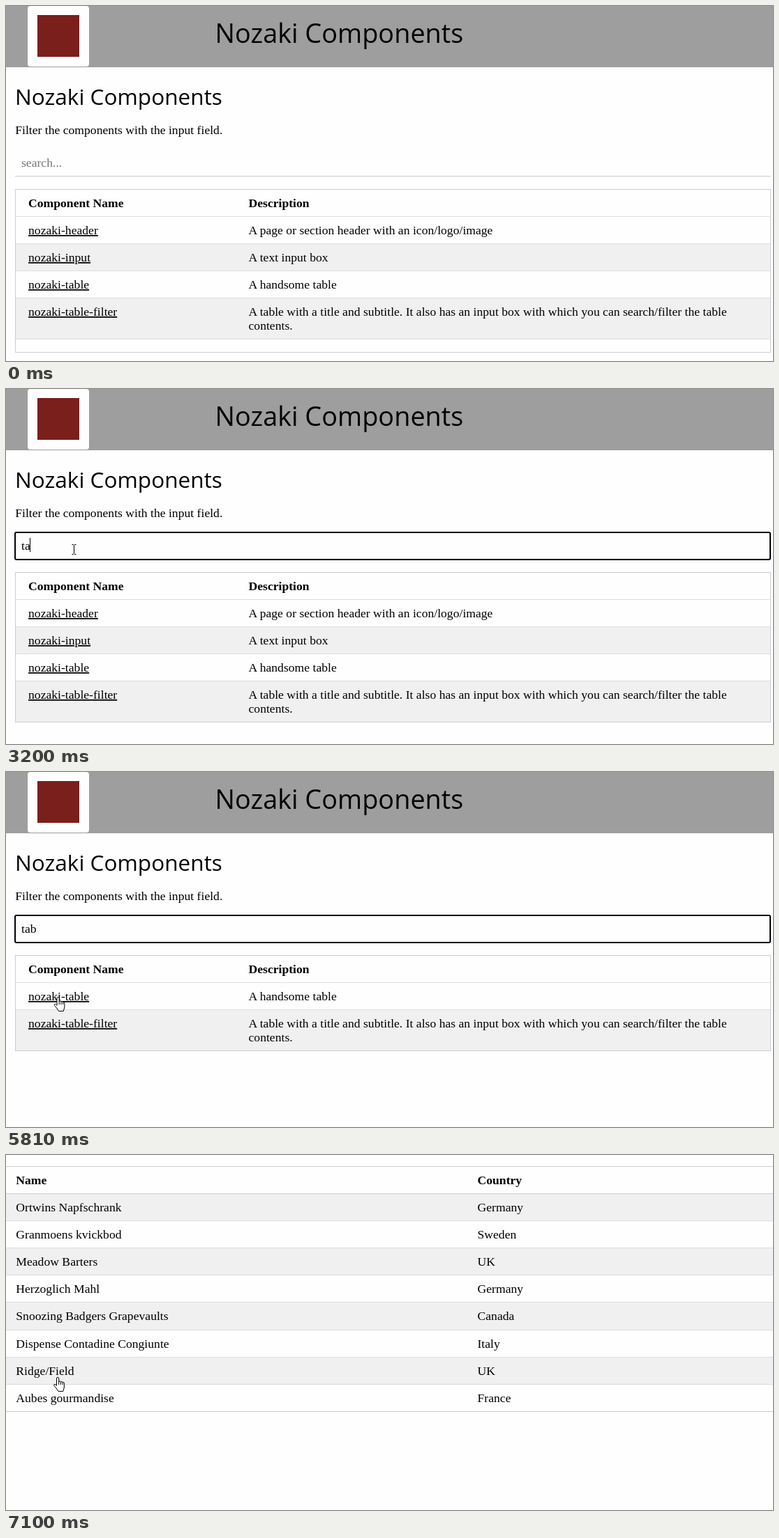
An HTML page that plays this animation: 1099x510 px, repeating every 8000 ms.

```html
<!DOCTYPE html>
<html lang="en">
<head>
<meta charset="utf-8">
<title>Component filter</title>
<style>
  html, body { margin: 0; width: 100%; height: 100%; overflow: hidden; background: #fefefe; }
  svg { display: block; width: 1099px; height: 510px; }
  text { font: 17.64px "Liberation Serif", serif; fill: #000; white-space: pre; }
  .bold { font-weight: bold; }
  .link { text-decoration: underline; }
  .hint { fill: #757575; }
  .mid { text-anchor: middle; }
  .title { font: 37.8px "Open Sans", sans-serif; }
  .heading { font: 31.55px "Open Sans", sans-serif; }
  .outline { fill: none; stroke: #ccc; }
  .cursor { fill: #fff; stroke: #000; stroke-linejoin: round; }
</style>
</head>
<body>
<svg id="stage" viewBox="0 0 1099 510"></svg>
<script>
const LOOP = 8000;
const stage = document.getElementById('stage');

function add(parent, tag, attrs = {}, content = '') {
  const node = document.createElementNS('http://www.w3.org/2000/svg', tag);
  for (const key in attrs) node.setAttribute(key, attrs[key]);
  node.textContent = content;
  return parent.appendChild(node);
}
const group = parent => add(parent, 'g');
const text = (parent, x, y, content, cls = '') => add(parent, 'text', { x, y, class: cls }, content);
const box = (parent, x, y, width, height, fill, rx = 0) =>
  add(parent, 'rect', { x, y, width, height, fill, rx });
const show = (node, on) => { node.style.display = on ? '' : 'none'; };

// Component list page
const listPage = group(stage);
box(listPage, 0, 0, 1099, 88, '#9e9e9e');
box(listPage, 31, 0, 88, 87, '#fefefe', 4);
box(listPage, 45, 13, 60, 60, '#7a1f1c');
text(listPage, 299.5, 53, 'Nozaki Components', 'title');
text(listPage, 13, 142, 'Nozaki Components', 'heading');
text(listPage, 13.2, 184, 'Filter the components with the input field.');

box(listPage, 13, 244, 1083, 1, '#ccc');
const focusRing = add(listPage, 'rect',
  { x: 13, y: 206, width: 1082, height: 39, rx: 2, fill: 'none', stroke: '#000', 'stroke-width': 2 });
const inputText = text(listPage, 22, 231, '');
const caret = box(listPage, 22, 214, 1, 20, '#000');

const components = [
  ['nozaki-header', 'A page or section header with an icon/logo/image'],
  ['nozaki-input', 'A text input box'],
  ['nozaki-table', 'A handsome table'],
  ['nozaki-table-filter',
    'A table with a title and subtitle. It also has an input box with which you can search/filter the table',
    'contents.'],
];

function componentTable(rows, emptyRow) {
  const table = group(listPage);
  let y = 302;
  text(table, 32, 289, 'Component Name', 'bold');
  text(table, 347.5, 289, 'Description', 'bold');
  box(table, 14, y, 1081, 1, '#ddd');
  rows.forEach(([name, ...lines], i) => {
    const height = lines.length > 1 ? 59 : 39;
    if (i % 2) box(table, 14, y + 1, 1081, height - 1, '#f0f0f0');
    text(table, 32, y + 26, name, 'link');
    lines.forEach((line, n) => text(table, 347.5, y + 26 + n * 20, line));
    y += height;
    box(table, 14, y, 1081, 1, '#ddd');
  });
  if (emptyRow) y += 19;
  add(table, 'rect', { x: 13.5, y: 263.5, width: 1082, height: y - 263, class: 'outline' });
  return table;
}
const tables = [
  componentTable(components, true),
  componentTable(components, false),
  componentTable(components.slice(2), false),
];

// Example table, before and after its styling arrives
const customers = [
  ['Name', 'Country'],
  ['Ortwins Napfschrank', 'Germany'],
  ['Granmoens kvickbod', 'Sweden'],
  ['Meadow Barters', 'UK'],
  ['Herzoglich Mahl', 'Germany'],
  ['Snoozing Badgers Grapevaults', 'Canada'],
  ['Dispense Contadine Congiunte', 'Italy'],
  ['Ridge/Field', 'UK'],
  ['Aubes gourmandise', 'France'],
];
const plainPage = group(stage);
const styledPage = group(stage);
const lineY = i => Math.floor(16.4 + 39.1 * i);

customers.forEach(([name, country], i) => {
  const plainY = Math.round(17.4 + 24.2 * i);
  text(plainPage, i ? -0.8 : 108, plainY, name, i ? '' : 'bold mid');
  text(plainPage, i ? 222 : 295, plainY, country, i ? '' : 'bold mid');

  const y = lineY(i);
  if (i % 2) box(styledPage, 0, y, 1099, lineY(i + 1) - y, '#f0f0f0');
  box(styledPage, 0, y, 1099, 1, i < 2 ? '#ccc' : '#ddd');
  text(styledPage, 14.3, y + 26, name, i ? '' : 'bold');
  text(styledPage, 675.5, y + 26, country, i ? '' : 'bold');
});
box(styledPage, 0, lineY(9), 1099, 1, '#ccc');

// Cursors, each with its hot spot at the origin
const pointer = add(stage, 'g', { class: 'cursor' });
const shapes = { arrow: group(pointer), beam: group(pointer), hand: group(pointer) };
add(shapes.arrow, 'path', { d: 'M.5 .5V16.5L4 13 6.5 18.5 9 17.5 6.5 12H11.5Z' });
add(shapes.beam, 'path', { d: 'M-3-7h2l1 1 1-1h2M0-6V6M-3 7h2l1-1 1 1h2', fill: 'none' });
add(shapes.hand, 'path', {
  d: 'M-2 12V2a1.6 1.6 0 0 1 3.2 0V7q.3-1 1.5-1t1.3 1.4q.3-.8 1.4-.8t1.3 1.4q.3-.6 1-.6 1.2 0 1.2 1.6' +
     'V14q0 2-1 4l-.5 2.5H.5L-2.5 16-5.5 12.5q-.8-2 .8-2.2 1 0 2.7 2Z',
});
add(shapes.hand, 'path', { d: 'M1.2 6.5V11M4 7.4V11M6.7 8V11', fill: 'none' });

// Tracks: each entry holds from its time until the next one
const views = [[0, listPage], [6800, plainPage], [7100, styledPage]];
const tableSteps = [[0, 0], [3100, 1], [3300, 2]];
const typed = [[0, ''], [3010, 't'], [3200, 'ta'], [4110, 'tab']];
const focus = [[0, false], [1900, true], [6120, false]];
const blink = [[0, false], [2000, true], [2500, false], [3010, true], [3710, false],
  [4110, true], [4710, false], [5220, true], [5710, false]];
const caretX = [22, 27, 34, 43];
const moves = [
  [0, '', 0, 0],
  [290, 'arrow', 893, 488], [390, 'arrow', 640, 330], [490, 'beam', 490.5, 228.5],
  [690, 'arrow', 330, 193], [790, 'beam', 210.5, 170.5],
  [990, 'beam', 205.5, 174.5], [1090, 'beam', 184.5, 184.5], [1190, 'arrow', 155, 200],
  [1290, 'beam', 128.5, 215.5], [1390, 'beam', 107.5, 226.5], [1500, 'beam', 97.5, 230.5],
  [5310, 'beam', 96.5, 234.5], [5410, 'arrow', 88, 252], [5510, 'arrow', 85, 284],
  [5610, 'hand', 80, 315], [5710, 'hand', 76, 328], [5810, 'hand', 75, 323], [5910, 'hand', 74.5, 319],
];
const at = (track, time) => track.findLast(([start]) => start <= time).slice(1);

function render(time) {
  const [view] = at(views, time);
  for (const [, page] of views) show(page, page === view);

  const [tableIndex] = at(tableSteps, time);
  tables.forEach((table, i) => show(table, i === tableIndex));

  const [value] = at(typed, time);
  inputText.textContent = value || 'search...';
  inputText.setAttribute('class', value ? '' : 'hint');
  show(focusRing, at(focus, time)[0]);
  show(caret, at(blink, time)[0]);
  caret.setAttribute('x', caretX[value.length]);
  caret.setAttribute('y', value ? 214 : 215);

  const [shape, x, y] = at(moves, time);
  for (const name in shapes) show(shapes[name], name === shape);
  pointer.setAttribute('transform', `translate(${x} ${y})`);
}

const start = performance.now();
function tick(now) {
  render(Math.max(0, now - start) % LOOP);
  requestAnimationFrame(tick);
}
render(0);
requestAnimationFrame(tick);
</script>
</body>
</html>
```
